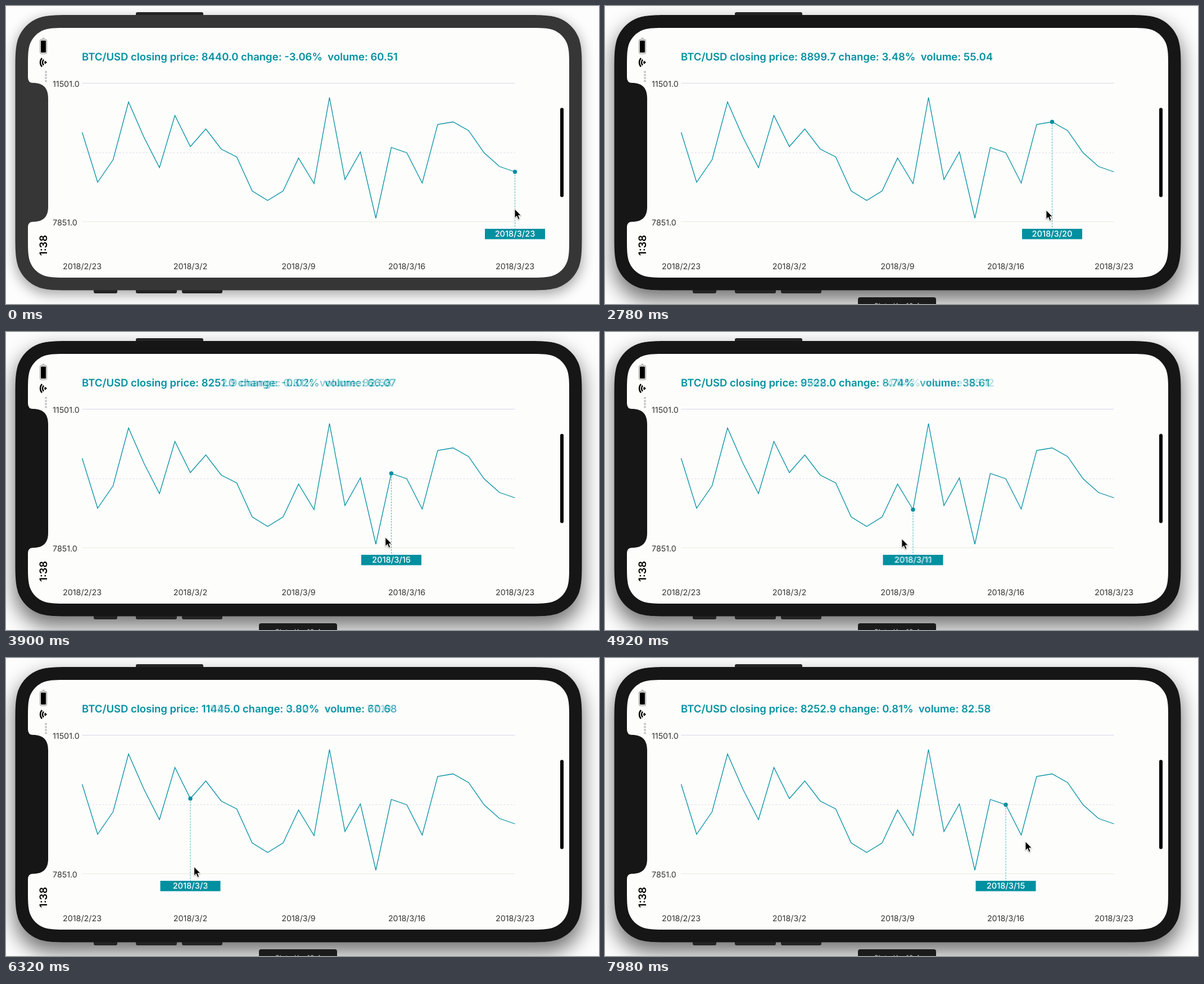
Write an HTML page that moves like this. It is 1055 px wide and 531 px high and loops after 8 s.

```html
<!DOCTYPE html>
<html lang="en">
<head>
<meta charset="utf-8">
<title>Price chart on a phone</title>
<style>
  html, body { margin: 0; width: 100%; height: 100%; overflow: hidden; background: #fdfdfd; }
  svg { display: block; width: 1055px; height: 531px; --body: #363636; }
  svg.active { --body: #161616; }
  text { font-family: Inter, "Liberation Sans", sans-serif; white-space: pre; text-rendering: geometricPrecision; }
  .body { fill: var(--body); }
  .button { fill: #242424; }
  .shadow { fill: #000; opacity: .34; filter: blur(11px); }
  .active .shadow { opacity: .56; filter: blur(18px); transform: translateY(10px); }
  .caption { display: none; }
  .active .caption { display: inline; }
  .title { font-size: 18.5px; font-weight: 600; fill: #0090a0; }
  .axis { font-size: 14.3px; fill: #333; }
  .mid { text-anchor: middle; }
  .date { font-size: 14.6px; font-weight: 500; fill: #fff; text-anchor: middle; }
  .clock { font-size: 18.4px; font-weight: 600; text-anchor: middle; }
  .caption text { font-size: 13px; fill: #ccc; text-anchor: middle; }
  .fade { isolation: isolate; }
  .fade text { mix-blend-mode: plus-lighter; }
  .pointer { filter: drop-shadow(0 1px 1px rgba(0, 0, 0, .35)); }
</style>
</head>
<body>
<svg id="stage" viewBox="0 0 1055 531">
  <rect class="shadow" x="16" y="22" width="1009" height="492" rx="64"/>
  <g class="button">
    <rect x="231" y="11" width="120" height="12" rx="3"/>
    <rect x="156" y="500" width="42" height="12" rx="3"/>
    <rect x="231" y="500" width="73" height="12" rx="3"/>
    <rect x="313" y="500" width="72" height="12" rx="3"/>
  </g>
  <path class="body" id="body"/>
  <path id="screen" fill="#fdfdfc"/>
  <path class="body" d="M38 127H39Q39 137 48 137C66 137 75 146 75 164V358C75 376 66 384.500 48 384.500Q39 384.500 39 394H38Z"/>

  <!-- status bar, turned on its side -->
  <rect x="60.500" y="59.500" width="12" height="25.500" rx="2.500" fill="none" stroke="#8a8a8a"/>
  <path d="M64 58Q66.500 55.500 69 58Z" fill="#8a8a8a"/>
  <rect x="62" y="61.500" width="9" height="21.500" rx="1"/>
  <g fill="none" stroke="#000" stroke-width="2.500">
    <path d="M64 92.800A11.600 11.600 0 0 0 64 108.200"/>
    <path d="M67 95.500A7.400 7.400 0 0 0 67 105.500"/>
  </g>
  <path d="M73 100.500L69.600 97.400A4.600 4.600 0 0 0 69.600 103.600Z"/>
  <path d="M71 117.500V134" stroke="#c4c4c8" stroke-width="4" stroke-linecap="round" stroke-dasharray="0 5.400"/>
  <text class="clock" transform="translate(73 426.500) rotate(-90)">1:38</text>
  <rect x="986" y="181.500" width="6" height="159" rx="3"/>

  <!-- chart -->
  <path d="M135.500 137.500H905.500" stroke="#d6d6ea"/>
  <path d="M135.500 261.500H905.500" stroke="#dfd9e6" stroke-dasharray="3 3"/>
  <path d="M135.500 384.500H905.500" stroke="#eaeadc"/>
  <text class="axis" x="83" y="144">11501.0</text>
  <text class="axis" x="83" y="391">7851.0</text>
  <g id="days"></g>
  <polyline id="line" fill="none" stroke="#0090a0" stroke-width="1.300"/>
  <g class="fade" id="title">
    <text class="title" x="135" y="97"></text>
    <text class="title" x="135" y="97"></text>
  </g>
  <path id="drop" stroke="#0090a0" stroke-opacity=".7" stroke-dasharray="3 2"/>
  <g id="marker">
    <circle id="dot" r="3.700" fill="#0090a0"/>
    <rect x="-53.500" y="397" width="107" height="18.500" fill="#0090a0"/>
    <g class="fade" id="date">
      <text class="date" y="410.500"></text>
      <text class="date" y="410.500"></text>
    </g>
  </g>

  <g class="caption">
    <rect x="450" y="519" width="139" height="24" rx="4" fill="#1b1b1b"/>
    <text x="519.500" y="539">Slate K – 10.4</text>
  </g>
  <path class="pointer" id="pointer" d="M0 0V16L3.700 12.500L6.300 18.600L9 17.500L6.500 11.500H11.400Z" stroke="#fff"/>
</svg>

<script>
const LOOP = 8000, PRESS = 2180, TURN = 6650, LAG = 140, FADE = 250;
const LEFT = 135.5, STEP = 27.5;

// the plotted curve, one height per day
const heights = [225, 314, 274, 171, 234, 288, 195, 250.5, 219, 255, 269, 329.5, 346.5, 329.5, 271,
  316.5, 163, 309, 260, 378, 252, 261.5, 315.5, 211, 206.5, 222, 261.5, 286, 295.5];
const LAST = heights.length - 1;

// turning points of the closing price, by day
const closings = [[0, 10140], [6, 10925], [7, 11026], [8, 11445], [14, 9217], [15, 8762], [16, 9528],
  [19, 8186.6], [20, 8252.9], [21, 8251], [24, 8600.4], [25, 8899.7], [27, 8706.4], [28, 8440]];

// pointer x over time
const drag = [[0, 905], [1000, 905], [1700, 885], [PRESS, 885], [2780, 785], [3900, 675],
  [4700, 563], [6100, 341], [TURN, 325], [LOOP, 754]];

const $ = id => document.getElementById(id);
const xOf = i => LEFT + i * STEP;
const dateOf = i => '2018/' + (i < 6 ? '2/' + (23 + i) : '3/' + (i - 5));

function along(keys, at) {
  const k = Math.max(1, keys.findIndex(key => key[0] >= at));
  const [a, from] = keys[k - 1], [b, to] = keys[k];
  return from + (to - from) * (at - a) / (b - a);
}

function titleOf(i) {
  const price = along(closings, i);
  const change = i ? (price / along(closings, i - 1) - 1) * 100 : 0;
  const volume = 28 + (32.51 + (LAST - i) * 16.50875) % 55;
  return `BTC/USD closing price: ${price.toFixed(1)} change: ${change.toFixed(2)}%  volume: ${volume.toFixed(2)}`;
}

// the hand sinks slowly to the left and rises on the way back
function pointerAt(t) {
  const x = along(drag, t);
  const rise = 38 * Math.max(0, (t - TURN) / (LOOP - TURN));
  return [x, 362 + (885 - x) / 55 - rise];
}

function indexAt(t) {
  if (t < PRESS + LAG) return LAST;
  return Math.round((along(drag, t - LAG) - LEFT) / STEP);
}

// every change of the selected day
const picks = [{ t: -FADE, from: LAST, to: LAST }];
for (let t = 0; t < LOOP; t += 10) {
  const from = picks[picks.length - 1].to, to = indexAt(t);
  if (to !== from) picks.push({ t, from, to });
}

function crossfade(id, textOf, pick, p) {
  const [before, after] = $(id).children;
  before.textContent = textOf(pick.from);
  after.textContent = textOf(pick.to);
  before.style.opacity = 1 - p;
  after.style.opacity = p;
}

function draw(t) {
  const pick = picks.filter(p => p.t <= t).pop();
  const p = Math.min(1, (t - pick.t) / FADE);
  const x = xOf(pick.to), y = heights[pick.to];
  $('stage').classList.toggle('active', t >= PRESS);
  $('marker').setAttribute('transform', `translate(${x} 0)`);
  $('dot').setAttribute('cy', y);
  $('drop').setAttribute('d', `M${x} ${y}V397`);
  crossfade('title', titleOf, pick, p);
  crossfade('date', dateOf, pick, p);
  $('pointer').setAttribute('transform', `translate(${pointerAt(t)})`);
}

// rectangle whose corners ease into the sides
function smoothRect(x0, y0, x1, y1, r) {
  const corner = (x, y, sx, sy, flip) => {
    const at = (u, v) => flip ? `${x + sx * v * r} ${y + sy * u * r}` : `${x + sx * u * r} ${y + sy * v * r}`;
    return `L${at(0, 1.528)}C${at(0, 1.089)} ${at(0, .868)} ${at(.075, .632)}` +
      `C${at(.169, .373)} ${at(.373, .169)} ${at(.632, .075)}` +
      `C${at(.868, 0)} ${at(1.089, 0)} ${at(1.528, 0)}`;
  };
  const d = corner(x0, y0, 1, 1, false) + corner(x1, y0, -1, 1, true) +
    corner(x1, y1, -1, -1, false) + corner(x0, y1, 1, -1, true);
  return 'M' + d.slice(1) + 'Z';
}

$('body').setAttribute('d', smoothRect(16.5, 16, 1024.5, 506.5, 67));
$('screen').setAttribute('d', smoothRect(39, 39, 1002, 484, 46));
$('line').setAttribute('points', heights.map((y, i) => xOf(i) + ',' + y).join(' '));
for (let i = 0; i <= LAST; i += 7) {
  $('days').innerHTML += `<text class="axis mid" x="${xOf(i)}" y="469">${dateOf(i)}</text>`;
}

const start = performance.now();
function tick() {
  draw((performance.now() - start) % LOOP);
  requestAnimationFrame(tick);
}
tick();
</script>
</body>
</html>
```
